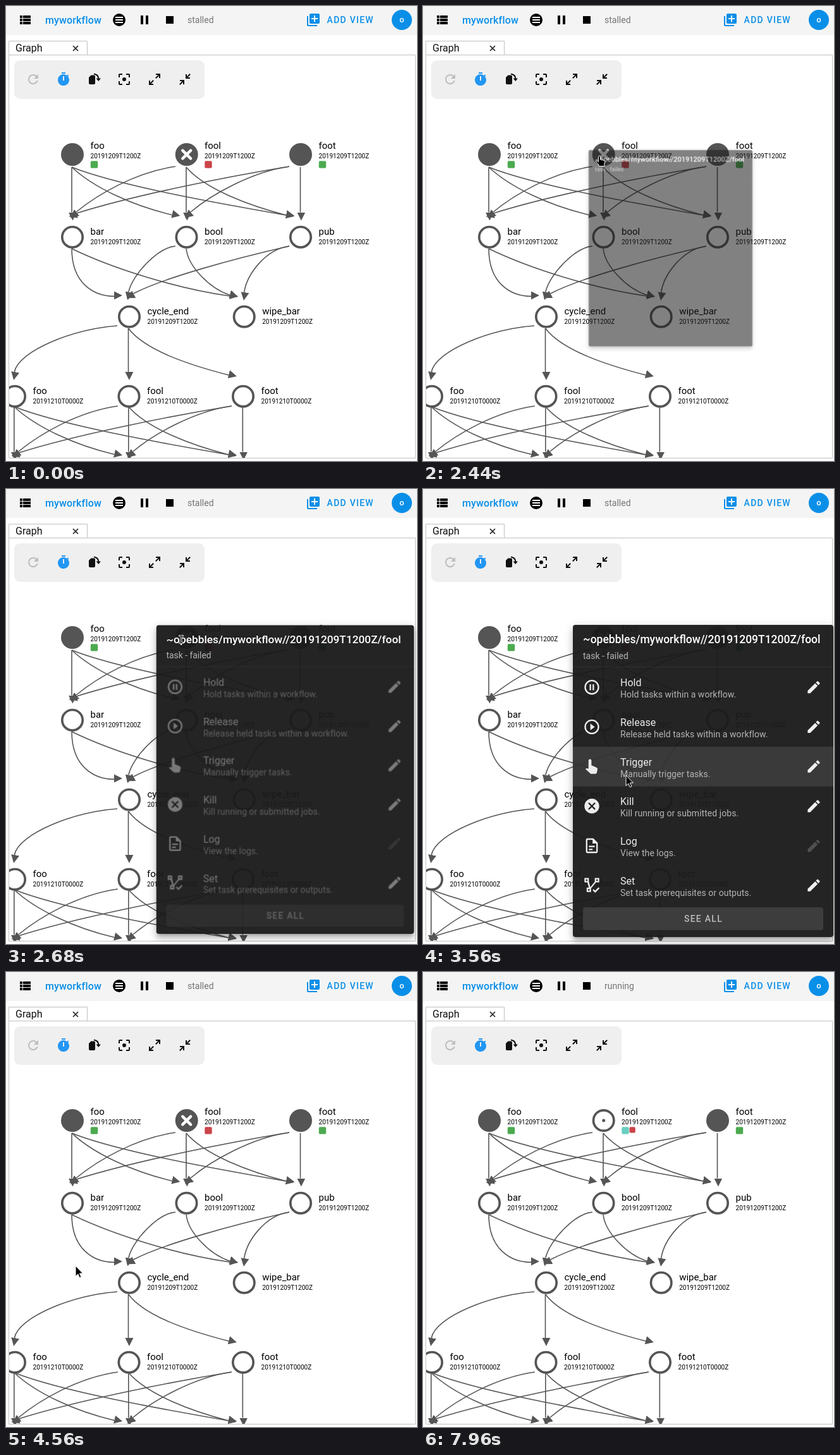
Animation, 650 px wide and 720 px high, one loop 8000 ms. Source, as an HTML page:

```html
<!DOCTYPE html>
<html lang="en">
<head>
<meta charset="utf-8">
<title>Workflow graph</title>
<style>
  html, body { margin: 0; width: 100%; height: 100%; overflow: hidden; background: #fff; }
  #stage { position: relative; width: 650px; height: 720px; overflow: hidden; }
  svg { position: absolute; left: 0; top: 0; display: block; }
  text { font-family: Roboto, sans-serif; white-space: pre; }
  #panel {
    position: absolute; left: 237px; top: 215px; width: 412px; height: 494px;
    border-radius: 4px; background: rgba(27, 27, 27, .955); transform-origin: 67px 35px;
    box-shadow: 0 5px 5px -3px rgba(0,0,0,.2), 0 8px 10px 1px rgba(0,0,0,.14), 0 3px 14px 2px rgba(0,0,0,.12);
  }
</style>
</head>
<body>
<div id="stage">
  <svg id="page" width="650" height="720">
    <defs>
      <marker id="head" markerUnits="userSpaceOnUse" markerWidth="14" markerHeight="14"
              refX="0" refY="8.4" orient="auto"><path d="M0 .5L13 7L0 13.5Z" fill="#555"/></marker>
      <clipPath id="view"><rect x="5" y="78" width="642" height="637"/></clipPath>
    </defs>
    <rect width="650" height="46" fill="#f4f4f4"/>
    <g id="bar"></g>
    <path d="M4.5 77.5H647.5V715.5H4.5V55.5H128.5V77.5" fill="none" stroke="#c0c0c0"/>
    <text x="15" y="72" font-size="16" fill="#111">Graph</text>
    <path d="M106 63l8 8m0-8l-8 8" stroke="#111" stroke-width="1.5"/>
    <g clip-path="url(#view)">
      <g id="edges" fill="none" stroke="#555" stroke-width="1.6"></g>
      <g id="nodes"></g>
    </g>
    <rect x="13" y="86" width="301" height="61" rx="9" fill="#efefef"/>
    <g id="tools"></g>
  </svg>
  <div id="panel"><svg id="menu" width="412" height="494" viewBox="237 215 412 494"></svg></div>
  <svg width="650" height="720">
    <g id="cursor" stroke="#fff" stroke-linejoin="round">
      <path id="arrow" d="M0 0V16.5L3.8 13L6.4 18.8L9 17.7L6.4 12H11.5Z"/>
      <path id="hand" d="M-1.6 1.2Q0-1.2 1.6 1.2V6L7 7.2Q9 7.8 8.8 9.8L7.8 13V16.5H-1.2V14L-5.8 9.2Q-5.6 7-3.6 8.2L-1.6 9.8Z"/>
      <path id="beam" d="M-3.5-6.5H3.5V-4.8H1V4.8H3.5V6.5H-3.5V4.8H-1V-4.8H-3.5Z" stroke-width=".8"/>
    </g>
  </svg>
</div>
<script>
const $ = id => document.getElementById(id);
const BLUE = '#0a8fe8', GREY = '#555', GREEN = '#4caa4f', RED = '#cb4549', TEAL = '#69cfc2';

const icon = (d, cx, cy, fill, k = 1) =>
  `<path d="${d}" fill="${fill}" fill-rule="evenodd" transform="translate(${cx} ${cy}) scale(${k}) translate(-12 -12)"/>`;
const text = (s, x, y, size, fill, extra = '') =>
  `<text x="${x}" y="${y}" font-size="${size}" fill="${fill}" ${extra}>${s}</text>`;
const MEDIUM = 'font-weight="500"';
const RING = 'M12 2A10 10 0 1 0 12 22A10 10 0 1 0 12 2M12 4A8 8 0 1 1 12 20A8 8 0 1 1 12 4Z';

// Header bar
$('bar').innerHTML =
  icon('M9 5V9H21V5M9 19H21V15H9M9 14H21V10H9M4 9H8V5H4M4 19H8V15H4M4 14H8V10H4V14Z', 30, 22, '#000') +
  text('myworkflow', 62, 28, 16, BLUE, MEDIUM + ' letter-spacing=".15"') +
  '<circle cx="179" cy="22" r="10"/><path d="M173 18h12m-12 4h12m-12 4h12" stroke="#fff" stroke-width="2"/>' +
  icon('M14 19H18V5H14M6 19H10V5H6V19Z', 219, 22, '#000') +
  icon('M18 18H6V6H18V18Z', 259, 22, '#000') +
  text('stalled', 287, 27, 14, '#757575', 'id="status"') +
  icon('M19 11H15V15H13V11H9V9H13V5H15V9H19M20 2H8A2 2 0 0 0 6 4V16A2 2 0 0 0 8 18H20A2 2 0 0 0 22 16V4A2 2 0 0 0 20 2M4 6H2V20A2 2 0 0 0 4 22H18V20H4Z', 486, 22, BLUE) +
  text('ADD VIEW', 507.6, 27, 14, BLUE, MEDIUM + ' letter-spacing="1.25"') +
  `<circle cx="626" cy="22" r="16" fill="${BLUE}"/>` +
  text('o', 626, 26, 13, '#fff', MEDIUM + ' text-anchor="middle"');

// Graph toolbar
const tools = [
  'M17.65 6.35C16.2 4.9 14.2 4 12 4A8 8 0 1 0 19.73 14H17.65A6 6 0 1 1 16.22 7.78L13 11H20V4Z',
  'M19 7.4L20.45 6L19 4.56L17.6 6A9 9 0 1 0 19 7.4M13 14H11V7H13V14M15 1H9V3H15V1Z',
  'M7.5 5.5H12Q14 5.5 14 7.5V18Q14 20 12 20H6Q4 20 4 18V9ZM12 2.5Q20 3.5 20.3 10.5H23L19.3 15L15.5 10.5H18.3Q17.5 5.5 12 4.5Z',
  'M12 9A3 3 0 0 0 12 15A3 3 0 0 0 12 9M19 19H15V21H19A2 2 0 0 0 21 19V15H19M19 3H15V5H19V9H21V5A2 2 0 0 0 19 3M5 5H9V3H5A2 2 0 0 0 3 5V9H5M5 15H3V19A2 2 0 0 0 5 21H9V19H5V15Z',
  'M10 21V19H6.4L10.9 14.5L9.5 13.1L5 17.6V14H3V21H10M14.5 10.9L19 6.4V10H21V3H14V5H17.6L13.1 9.5Z',
  'M19.5 3.1L15 7.6V4H13V11H20V9H16.4L20.9 4.5ZM4 13V15H7.6L3.1 19.5L4.5 20.9L9 16.4V20H11V13H4Z'
];
$('tools').innerHTML = tools.map((d, i) =>
  icon(d, 43 + 48 * i, 116, ['#bdbdbd', '#2296f3'][i] || '#111')).join('');

// Graph edges: each path ends at the base of its arrowhead
const fan = [
  'M104 255V326.5', 'M104 255C138 287 200 316 262.4 330.5', 'M104 255C180 285 340 313 443 331',
  'M268 254C205 263 145 298 111 326', 'M285 255V326.5', 'M285 255C315 290 385 316 443 331',
  'M448 254C350 270 200 300 111.5 328', 'M448 254C390 262 325 298 292 326', 'M465.5 255V326.5'
];
const links = [
  'M104 384C104 440 140 459.4 171 459.4', 'M104 384C170 416 270 447 354 459',
  'M268 380C240 382 200 425 193.8 452.5', 'M285 384C288 412 322 447 354 457.5',
  'M448 380C360 400 250 430 201.7 455', 'M448 380C410 385 381 425 376.6 453',
  'M176 506C110 510 20 545 13.3 579', 'M193.5 510V579', 'M193.5 510C220 545 290 568 352 584'
];
const draw = ds => ds.map(d => `<path d="${d}" marker-end="url(#head)"/>`).join('');
$('edges').innerHTML = draw(fan) + draw(links) + `<g transform="translate(-91.2 379)">${draw(fan)}</g>`;

// Graph nodes
const DAY1 = '20191209T1200Z', DAY2 = '20191210T0000Z';
const job = (x, y, w, fill, id = '') =>
  `<rect ${id && `id="${id}"`} x="${x}" y="${y}" width="${w}" height="${w}" rx="1.8" fill="${fill}"/>`;
const disc = (x, y) => `<circle cx="${x}" cy="${y}" r="18" fill="${GREY}"/>`;
const ring = (x, y) => `<circle cx="${x}" cy="${y}" r="16.2" fill="#fff" stroke="${GREY}" stroke-width="3.7"/>`;
const label = (name, cycle, x, y) =>
  text(name, x + 28.5, y, 15, '#000') + text(cycle, x + 28.5, y + 15.3, 10.05, '#000');
const waiting = [
  ['bar', 105, 366], ['bool', 285.5, 366], ['pub', 466, 366], ['cycle_end', 195, 492], ['wipe_bar', 376.7, 492],
  ['foo', 14, 618], ['fool', 194.5, 618], ['foot', 375, 618]
];
$('nodes').innerHTML =
  waiting.map(([n, x, y]) => ring(x, y - .3) + label(n, y > 600 ? DAY2 : DAY1, x, y - 4.3)).join('') +
  ['foo', 'fool', 'foot'].map((n, i) => label(n, DAY1, [105, 285.5, 466][i], 226)).join('') +
  disc(105, 235) + disc(466, 235) + job(133.8, 245.2, 11.4, GREEN) + job(494.8, 245.2, 11.4, GREEN) +
  `<g id="failed">${disc(285.7, 235)}<path d="M279.3 228.6l12.8 12.8m0-12.8l-12.8 12.8" stroke="#fff" stroke-width="4.5" stroke-linecap="round"/></g>` +
  `<g id="queued">${ring(285.7, 235)}<circle cx="285.7" cy="235" r="2.5" fill="${GREY}"/></g>` +
  job(314.3, 245.2, 11.4, RED, 'oldJob') +
  `<g id="newJob">${job(314.3, 245.2, 11.4, TEAL)}${job(326.5, 245.2, 9.3, RED)}</g>`;

// Task menu
const ROW = 62.7, TOP = 282.5;
const PENCIL = 'M20.7 7C21.1 6.65 21.1 6 20.7 5.6L18.4 3.3C18 2.9 17.35 2.9 17 3.3L15.1 5.1L18.9 8.9M3 17.25V21H6.75L17.8 9.9L14.06 6.2Z';
const items = [
  ['Hold', 'Hold tasks within a workflow.', RING + 'M13 16V8H15V16H13M9 16V8H11V16H9Z'],
  ['Release', 'Release held tasks within a workflow.', RING + 'M10 16.5L16 12L10 7.5Z'],
  ['Trigger', 'Manually trigger tasks.', 'M9.5 2A2 2 0 0 1 11.5 4V10.5L17.5 13Q20 14 19.7 16L18.8 20.3Q18.4 22 16.5 22H10.5L3.5 15.5L4.8 14.2L7.5 15.2V4A2 2 0 0 1 9.5 2Z'],
  ['Kill', 'Kill running or submitted jobs.', 'M12 2A10 10 0 1 0 12 22A10 10 0 1 0 12 2M15.6 7L12 10.6L8.4 7L7 8.4L10.6 12L7 15.6L8.4 17L12 13.4L15.6 17L17 15.6L13.4 12L17 8.4Z'],
  ['Log', 'View the logs.', 'M6 2A2 2 0 0 0 4 4V20A2 2 0 0 0 6 22H18A2 2 0 0 0 20 20V8L14 2H6M6 4H13V9H18V20H6V4M8 12V14H16V12H8M8 16V18H13V16H8Z'],
  ['Set', 'Set task prerequisites or outputs.', 'M2 2H8V6.5L10 14.5L16 7V2H22V8H17.6L11 16.2V21H5V15H8L6 8H2ZM4 4V6H6V4ZM18 4V6H20V4ZM7 17V19H9V17ZM13 18.5L14.4 17.1L16.5 19.2L21 14.7L22.4 16.1L16.5 22Z']
];
const row = ([name, hint, d], i) => {
  const y = 313.7 + ROW * i;
  return icon(d, 267, y, '#ececec', 1.17) +
    text(name, 312, y - 1.5, 16, '#ececec') +
    text(hint, 312, y + 16.5, 14, '#b4b4b4', 'letter-spacing=".05"') +
    icon(PENCIL, 618, y, i === 4 ? '#505050' : '#f0f0f0', 1.07);
};
$('menu').innerHTML =
  `<clipPath id="rowClip"><rect x="237" y="${TOP + ROW * 2}" width="412" height="${ROW}"/></clipPath>` +
  text('~opebbles/myworkflow//20191209T1200Z/fool', 253, 244, 17.5, '#fff', MEDIUM) +
  text('task - failed', 253, 268.5, 14, '#b4b4b4') +
  '<path d="M237 281.5H649" stroke="#fff" stroke-opacity=".06"/>' +
  `<rect id="hover" x="237" width="412" height="${ROW}" fill="#fff" fill-opacity=".1"/>` +
  `<circle id="ripple" cx="322" cy="${TOP + ROW * 2.5}" fill="#fff" fill-opacity=".2" clip-path="url(#rowClip)"/>` +
  `<g id="list">${items.map(row).join('')}` +
  '<rect x="253" y="662" width="380" height="36" rx="4" fill="#3d3d3d"/>' +
  text('SEE ALL', 443.5, 685, 14, '#bdbdbd', MEDIUM + ' text-anchor="middle" letter-spacing="1.25"') + '</g>';

// Timeline
const clamp = v => Math.min(1, Math.max(0, v));
const smooth = p => p * p * (3 - 2 * p);
const linear = p => p;
function track(keys, t, ease = linear, col = 1) {
  let i = 0;
  while (i < keys.length - 2 && t >= keys[i + 1][0]) i++;
  const a = keys[i], b = keys[i + 1];
  return a[col] + (b[col] - a[col]) * ease(clamp((t - a[0]) / (b[0] - a[0])));
}
const show = (id, on) => { $(id).style.display = on ? '' : 'none'; };

const OPEN = 2360, CLOSE = 4280, SHUT = 4460;
const scale = [[OPEN, .5], [2440, .627], [2520, .765], [2680, .989], [2760, 1], [CLOSE, 1], [SHUT, .6]];
const fade = [[OPEN, .2], [2440, .57], [2520, .8], [2640, 1], [CLOSE, 1], [SHUT, 0]];
const listFade = [[2500, 0], [2680, .43], [2920, 1]];
const path = [
  [80, 632, 716], [560, 234, 340], [840, 276, 264], [1400, 280, 235], [2200, 280, 235], [2440, 279, 237],
  [2680, 277, 238], [2900, 277, 238], [3560, 321, 453], [CLOSE, 321, 453], [4540, 110, 465], [4620, 110, 465], [4960, 80, 735]
];

function render(t) {
  const x = track(path, t, smooth, 1), y = track(path, t, smooth, 2);
  const open = t >= OPEN && t < SHUT;

  show('panel', open);
  $('panel').style.opacity = track(fade, t);
  $('panel').style.transform = `scale(${track(scale, t)})`;
  $('list').setAttribute('opacity', track(listFade, t));
  const over = Math.floor((y - TOP) / ROW);
  show('hover', open && t > 2700 && t < CLOSE + 60 && over >= 0);
  $('hover').setAttribute('y', TOP + ROW * Math.max(0, over));
  const p = clamp((t - 3970) / 300);
  $('ripple').setAttribute('r', 340 * (1 - (1 - p) ** 2));

  const onNode = t < 2560 && Math.hypot(x - 286, y - 235) < 18;
  const onTitle = t >= 2560 && t < 3500 && y < 252;
  show('cursor', t >= 80 && t < 4960);
  show('hand', onNode);
  show('beam', onTitle);
  show('arrow', !onNode && !onTitle);
  $('cursor').setAttribute('transform', `translate(${x.toFixed(2)} ${y.toFixed(2)})`);

  show('failed', t < 5480);
  show('queued', t >= 5480);
  $('status').textContent = t < 7160 ? 'stalled' : 'running';
  show('oldJob', t < 7760);
  show('newJob', t >= 7760);
}

const start = performance.now();
function tick() {
  render((performance.now() - start) % 8000);
  requestAnimationFrame(tick);
}
render(0);
requestAnimationFrame(tick);
</script>
</body>
</html>
```
